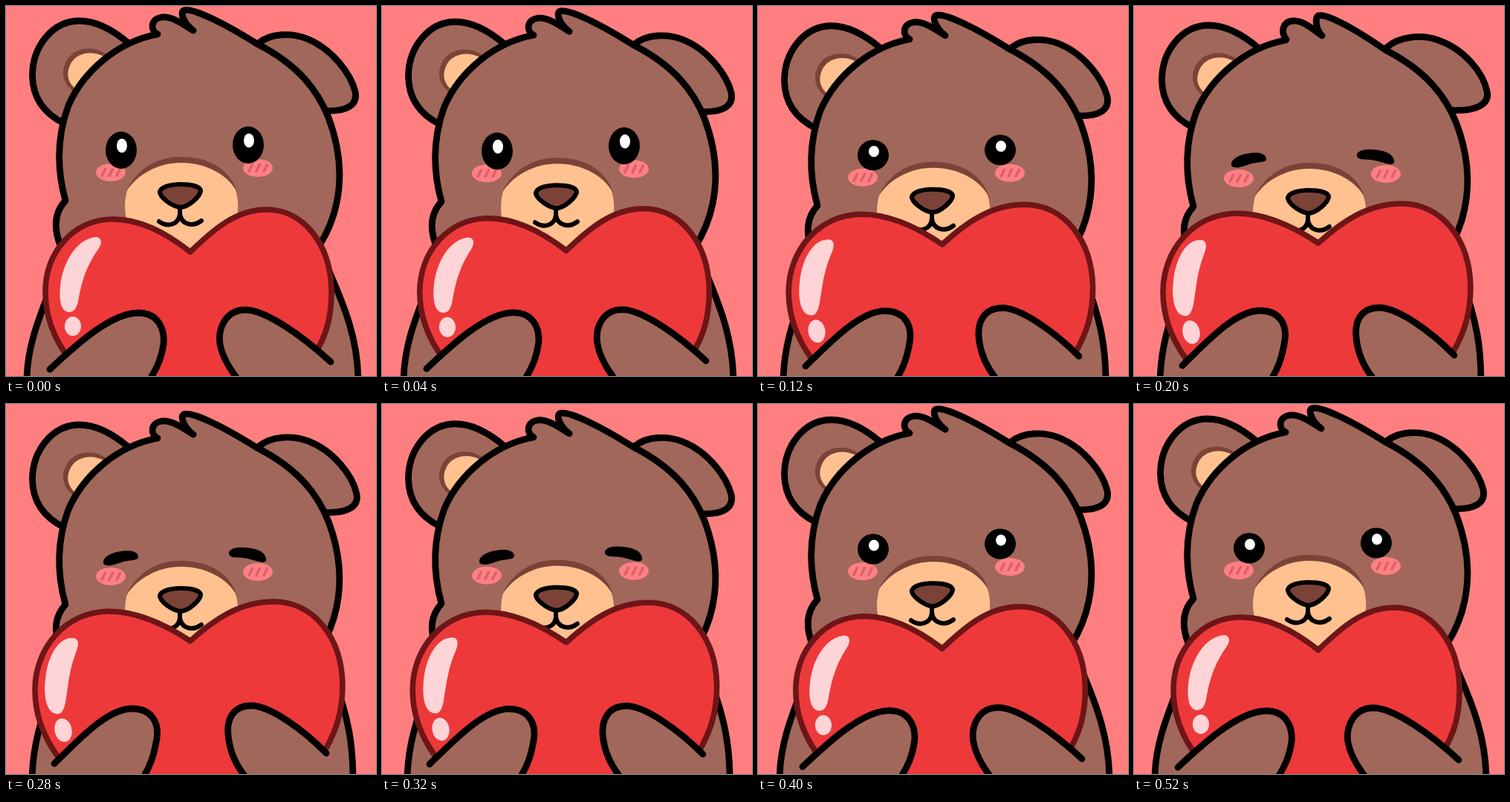
Write an HTML page with a canvas that moves like this. It is 498 by 498 pixels and loops after 560 ms.

```html
<!DOCTYPE html>
<html lang="en">
<head>
<meta charset="utf-8">
<title>Bear hug</title>
<style>
html, body { margin: 0; width: 100%; height: 100%; overflow: hidden; background: #ff7f80; }
canvas { display: block; width: 498px; height: 498px; }
</style>
</head>
<body>
<canvas id="stage" width="498" height="498"></canvas>
<script>
const ctx = document.getElementById('stage').getContext('2d');
const LOOP = 560, STEP = 40;
const BROWN = '#a1675a', DARK = '#7b4338', TAN = '#ffc18f', PINK = '#ff8084';
const RED = '#ee393b', MAROON = '#6e1517', SHINE = '#ffd4d7';

const smooth = x => {
  x = Math.min(1, Math.max(0, x));
  return x * x * (3 - 2 * x);
};

// Rises and falls once between two times.
const bump = (t, from, to) =>
  t > from && t < to ? Math.sin((t - from) / (to - from) * Math.PI) : 0;

// Blend two path strings that share the same commands.
const mix = (a, b, k) => {
  const ends = b.match(/-?[\d.]+/g);
  let i = 0;
  return a.replace(/-?[\d.]+/g, n => +n + (ends[i++] - n) * k);
};

function shape(d, fill, stroke, width = 8.8) {
  const path = new Path2D(d);
  if (fill) { ctx.fillStyle = fill; ctx.fill(path); }
  if (stroke) { ctx.strokeStyle = stroke; ctx.lineWidth = width; ctx.stroke(path); }
}

function oval(x, y, rx, ry, fill, turn = 0) {
  ctx.beginPath();
  ctx.ellipse(x, y, rx, ry, turn, 0, Math.PI * 2);
  ctx.fillStyle = fill;
  ctx.fill();
}

const BODY = [
  'M62 375C42 425 28 462 28 505L474 505C474 450 456 405 434 355',
  'M64 382C46 425 36 462 35 505L467 505C467 460 462 425 440 365'];
const HEART = [
  'M248 331C215 305 180 286 142 287C90 288 53 332 53 385C53 425 70 455 85 475L150 560L350 560L415 470C430 445 439 420 438 380C436 320 400 274 351 274C310 274 280 300 248 331Z',
  'M248 319C215 297 175 279 138 279C80 280 39 328 39 385C39 420 52 450 70 475L150 560L350 560L430 465C444 440 453 415 453 378C452 315 415 266 360 266C315 266 280 290 248 319Z'];
const GLOSS = [
  'M120 311C129 311 130 319 125 326C108 350 102 370 97 398C94 410 90 412 84 412C75 411 71 398 73 378C76 345 95 314 120 311Z',
  'M88 315C97 314 99 321 95 332C84 360 84 380 80 402C77 415 73 418 68 417C55 416 50 395 53 370C56 340 70 315 88 315Z'];
const LEFT_ARM = [
  'M59 489C90 460 140 413 178 413C205 413 214 435 212 455C209 475 203 488 192 505',
  'M65 484C95 455 135 410 170 410C197 410 206 430 203 450C199 475 193 490 183 505'];
const RIGHT_ARM = [
  'M437 479C400 445 350 409 322 409C295 409 285 435 288 455C291 472 302 490 314 505',
  'M431 470C400 438 355 406 330 406C305 406 297 425 299 445C301 470 311 489 325 505'];
const RIGHT_EAR = [
  'M340 50C357 36 385 36 405 44C440 58 464 92 470 115C474 134 458 142 430 141',
  'M340 48C357 32 388 30 410 38C445 50 470 82 475 106C480 124 460 134 428 132'];
const HAIR = [
  'M204 38C194 33 194 17 210 15C224 14 238 24 252 33C240 24 234 10 239 6C249 2 287 19 338 51',
  'M205 37C197 27 200 13 214 12C226 11 240 22 253 32C245 24 243 8 248 5C257 2 289 17 338 51'];
const HEAD_RIGHT = 'C395 80 420 115 434 150C449 190 453 227 445 265C440 290 432 306 422 322';
const HEAD_LEFT = 'L73 322C63 296 67 276 80 262C67 215 70 172 84 134C104 88 150 48 204 38';

function leftEar(flick) {
  ctx.save();
  ctx.translate(2 * flick, -2 * flick);
  shape('M165 50C140 29 118 20 99 20C62 20 35.5 55 35.5 94C36 122 50 144 78 158', BROWN, '#000');
  shape('M137 67C122 53 95 54 83 71C72 88 76 106 95 118Z', DARK);
  shape('M132 68C116 59 96 63 88 76C79 92 84 104 95 113Z', TAN);
  ctx.restore();
}

function blush(x, y) {
  oval(x, y, 20, 12, PINK);
  for (let i = -1; i < 2; i++)
    shape(`M${x + 10 * i - 2} ${y + 4.5}l4.5 -9`, null, '#dc6067', 3.5);
}

function eye(x, y, tall) {
  oval(x, y, 21, tall ? 25 : 20.5, '#000');
  oval(x + 1, y - (tall ? 6 : 5), 7, tall ? 9.5 : 7.5, '#fff');
}

function face(look) {
  shape('M162 249C178 216 206 203 236 203C268 203 300 216 311 250Z', DARK);
  shape('M163 248C177 227 204 211 236 211C264 211 294 223 309 247C315 270 314 290 295 315L248 345L175 315C158 290 158 268 163 248Z', TAN);
  blush(141, 224);
  blush(339, 218);
  if (look === 'shut') {
    shape('M131 205C131 196 148 189 166 189.5C174 190 179 194 178 199C176 203 165 202 157 204.5C149 207 143 209.5 138 209.5C133 209 131 208 131 205Z', '#000');
    shape('M350 200C349 190 334 185 316 185C305 185 299 189 300 194C302 200 312 198 322 199.5C332 201 340 205 345 205C349 205 351 203 350 200Z', '#000');
  } else {
    eye(155, 194, look === 'tall');
    eye(326, 187, look === 'tall');
  }
  shape('M207 250C209 243 222 240 235 240C250 240 262 243 262 249C261 256 246 271 234 271C222 269 207 257 207 250Z', DARK, '#000', 6.2);
  shape('M206 290C219 299 233 293 234 280V272M234 280C236 294 251 298 263 289', null, '#000', 6);
}

function draw(t) {
  const hug = smooth(t / 160) - smooth((t - 280) / 160);
  const flick = bump(t, 120, 280);
  const look = t < 120 ? 'tall' : t >= 160 && t < 400 ? 'shut' : 'round';
  const lerp = (a, b) => a + (b - a) * hug;

  ctx.lineCap = ctx.lineJoin = 'round';
  ctx.fillStyle = '#ff7f80';
  ctx.fillRect(0, 0, 498, 498);
  shape(mix(...BODY, hug), BROWN, '#000');

  ctx.save();
  ctx.translate(0, 8 * hug);
  leftEar(flick);
  // The floppy ear settles a little later.
  shape(mix(...RIGHT_EAR, bump(t, 120, 300)), BROWN, '#000');
  shape(mix(...HAIR, flick) + HEAD_RIGHT + HEAD_LEFT, BROWN, '#000');
  face(look);
  ctx.restore();

  shape(mix(...HEART, hug), RED, MAROON, 7.6);
  shape(mix(...GLOSS, hug), SHINE);
  oval(lerp(90, 77), lerp(431, 439), lerp(11, 11.5), lerp(13, 16), SHINE, -0.2 * hug);

  for (const arm of [LEFT_ARM, RIGHT_ARM]) {
    const d = mix(...arm, hug);
    shape(d + (arm === LEFT_ARM ? 'L60 505Z' : 'L437 505Z'), BROWN);
    shape(d, null, '#000');
  }
}

const start = performance.now();
function tick() {
  const t = (performance.now() - start) % LOOP;
  draw(Math.floor(t / STEP) * STEP);
  requestAnimationFrame(tick);
}
tick();
</script>
</body>
</html>
```
